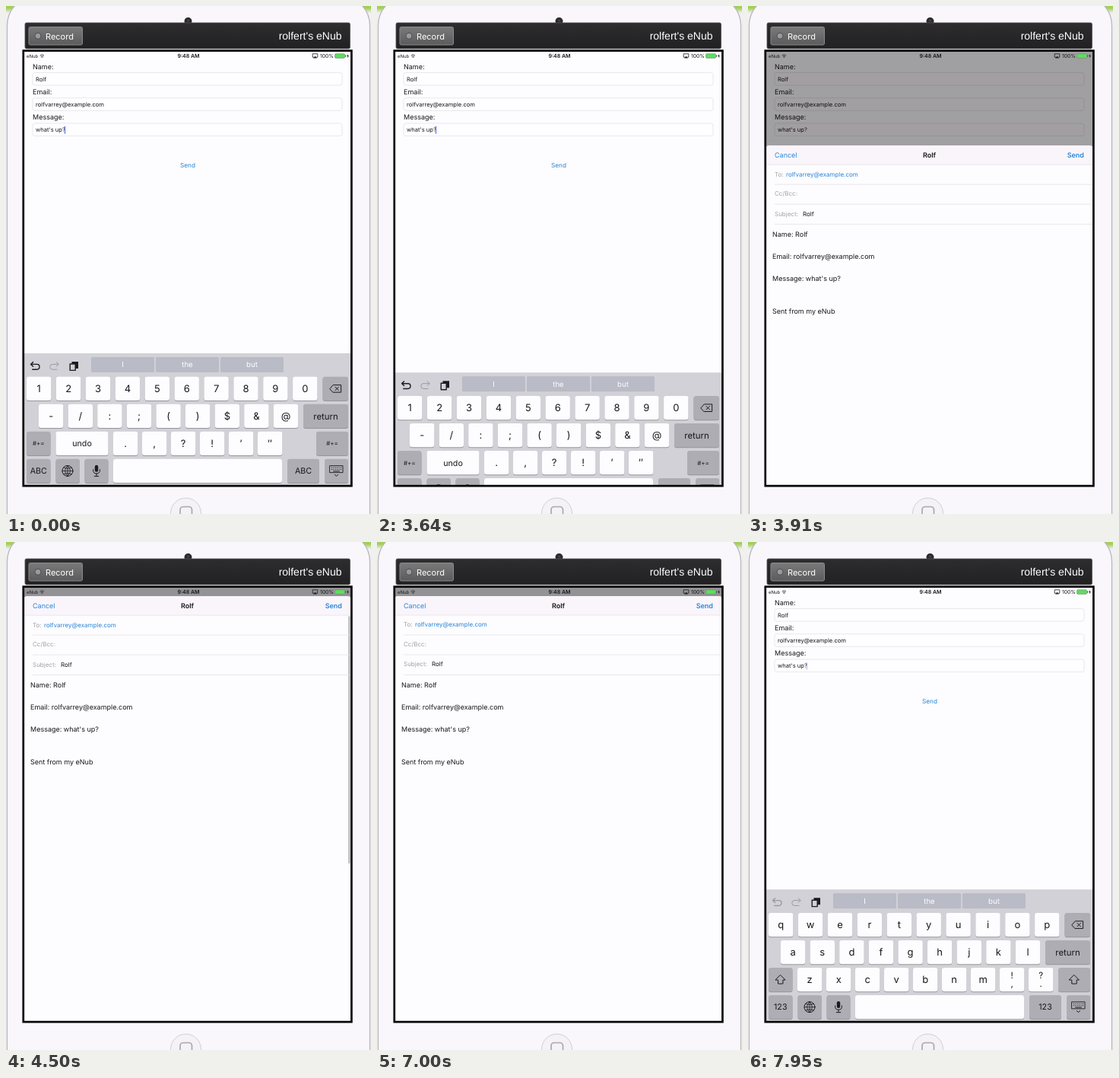
Animation of 480x667 px, one loop 8 s. Source, as an HTML page:

```html
<!DOCTYPE html>
<html lang="en">
<head>
<meta charset="utf-8">
<title>Contact form</title>
<style>
html, body { margin: 0; width: 100%; height: 100%; overflow: hidden; background: #f9f7fb; }
svg { display: block; width: 100vw; height: 100vh; }
text { font-family: Inter, Roboto, sans-serif; text-rendering: geometricPrecision; fill: #17171a; white-space: pre; }
.mid { text-anchor: middle; }
.end { text-anchor: end; }
.bold { font-weight: 600; }
.blue { fill: #2a86d8; }
.grey { fill: #a3a2a8; }
.white { fill: #fff; }
.line { fill: none; stroke: #1c1c1f; stroke-linecap: round; stroke-linejoin: round; }
.field { fill: #fefdff; stroke: #e7e5eb; stroke-width: .9; }
.rule { stroke: #e4e2e8; stroke-width: .8; }
</style>
</head>
<body>
<svg viewBox="0 0 480 667" preserveAspectRatio="none">
  <defs>
    <clipPath id="screen"><rect x="23" y="59" width="432" height="571"/></clipPath>
    <linearGradient id="edge" x2="0" y2="1">
      <stop offset=".004" stop-color="#a3cf58"/><stop offset=".014" stop-color="#f1f0f3"/>
    </linearGradient>
    <linearGradient id="btn" x2="0" y2="1">
      <stop offset="0" stop-color="#7b7a7b"/><stop offset="1" stop-color="#5c5b5c"/>
    </linearGradient>
    <linearGradient id="bar" x2="0" y2="1">
      <stop offset="0" stop-color="#2d2c2e"/><stop offset="1" stop-color="#212022"/>
    </linearGradient>
  </defs>

  <rect width="480" height="667" fill="url(#edge)"/>
  <rect x="1.5" y="-14" width="477" height="760" rx="40" fill="#f9f7fb" stroke="#b9b7bd" stroke-width="1.3"/>
  <circle cx="239.5" cy="20" r="5" fill="#2b2a2c"/>
  <circle cx="239.5" cy="19" r="1.6" fill="#434247"/>
  <circle cx="236.5" cy="666" r="20" fill="#f4f2f6" stroke="#d0ced4"/>
  <rect x="229" y="657.5" width="15.5" height="16" rx="4" fill="none" stroke="#aaa8ae" stroke-width="1.7"/>

  <rect x="25" y="22" width="427.5" height="34" rx="2" fill="url(#bar)" stroke="#58575a" stroke-width=".8"/>
  <rect x="30" y="27.5" width="70.5" height="23.5" rx="2" fill="url(#btn)" stroke="#8a898b"/>
  <circle cx="42" cy="39.3" r="4" fill="#99989a" stroke="#4d4c4e"/>
  <text x="52" y="43.8" font-size="11" class="white">Record</text>
  <text x="441.5" y="43.5" font-size="14" class="white end" style="font-family:'Liberation Sans',Arial,sans-serif">rolfert's eNub</text>

  <g clip-path="url(#screen)">
    <rect x="23" y="59" width="432" height="571" fill="#fdfcfe"/>
    <g id="form"></g>
    <rect id="caret" x="77" y="157.8" width="1" height="10" fill="#3f63d6"/>
    <rect id="dim" x="23" y="59" width="432" height="571" fill="#08060a"/>
    <g id="status">
      <path d="M45 64.8q2.4-2.4 4.8 0M46 66.3q1.4-1.3 2.8 0" class="line" stroke-width=".8"/>
      <circle cx="47.4" cy="67.5" r=".6" fill="#1c1c1f"/>
      <path d="M404.6 67.2h-1.4v-4.4h6.6v4.4h-1.4" class="line" stroke-width=".8"/>
      <path d="M404 68.6l2.5-2.8 2.5 2.8z" fill="#1c1c1f"/>
      <rect x="432.5" y="62.8" width="13" height="5.6" rx="1.2" fill="#5fdc62" stroke="#6c8a6e" stroke-width=".6"/>
      <rect x="446" y="64.5" width="1" height="2.2" fill="#555"/>
      <path d="M450 62.8l-2 3.2h1.4l-.6 2.6 2.2-3.4h-1.5z" fill="#1c1c1f"/>
    </g>
    <g id="sheet">
      <path d="M23 600V5q0-5 5-5H449q5 0 5 5V600z" fill="#fdfcfe"/>
      <path d="M23 25V5q0-5 5-5H449q5 0 5 5V25z" fill="#faf5fa"/>
      <rect id="scroll" x="450.4" y="26" width="2" height="325" rx="1" fill="#aeadb3"/>
    </g>
    <g id="keyboard">
      <rect x="23" y="456" width="432" height="180" fill="#d2d1d7"/>
    </g>
  </g>
  <rect x="22.8" y="58.7" width="431.6" height="571.4" fill="none" stroke="#050505" stroke-width="2.7"/>
</svg>
<script>
const $ = id => document.getElementById(id);
const NS = 'http://www.w3.org/2000/svg';
const MAIL = 'rolfvarrey@example.com', WHO = 'Rolf', SAYS = "what's up?";

function add(parent, tag, attrs, content) {
  const el = document.createElementNS(NS, tag);
  for (const k in attrs) el.setAttribute(k, attrs[k]);
  if (content) el.textContent = content;
  return parent.appendChild(el);
}
const text = (parent, x, y, size, str, cls = '') =>
  add(parent, 'text', { x, y, 'font-size': size, class: cls }, str);
const icon = (parent, d, attrs) => add(parent, 'path', { d, class: 'line', ...attrs });

// Form
const form = $('form');
[['Name:', WHO], ['Email:', MAIL], ['Message:', SAYS]].forEach(([label, value], i) => {
  const y = 82.7 + i * 33.3;
  text(form, 35, y, 9, label);
  add(form, 'rect', { x: 35, y: y + 4.8, width: 407, height: 16.6, rx: 3, class: 'field' });
  text(form, 39, y + 15.8, 7.6, value);
});
text(form, 239, 212.2, 8.2, 'Send', 'mid blue');

// Status bar
const status = $('status');
text(status, 27, 68, 6, 'eNub');
text(status, 240, 68, 7, '9:48 AM', 'mid bold');
text(status, 431, 68, 6.8, '100%', 'end');

// Mail sheet, measured from its top edge
const sheet = $('sheet');
text(sheet, 35, 15.8, 9, 'Cancel', 'blue');
text(sheet, 238.5, 15.8, 9, WHO, 'mid bold');
text(sheet, 442, 15.8, 9, 'Send', 'end bold blue');
add(sheet, 'path', { d: 'M23 25H454M35 51H454M35 77H454M35 103.4H454', class: 'rule' });
text(sheet, 35, 40.4, 8, 'To:', 'grey');
text(sheet, 50, 40.4, 8, MAIL, 'blue');
text(sheet, 35, 66.3, 8, 'Cc/Bcc:', 'grey');
text(sheet, 35, 92.4, 8, 'Subject:', 'grey');
text(sheet, 72, 92.4, 8, WHO);
text(sheet, 32, 119.8, 9, 'Name: ' + WHO);
text(sheet, 32, 148.7, 9, 'Email: ' + MAIL);
text(sheet, 32, 177.7, 9, 'Message: ' + SAYS);
text(sheet, 32, 220.8, 9, 'Sent from my eNub');

// Keyboard
const board = $('keyboard');
const ROW = [486.8, 522.8, 558.8, 594.8], KEY_H = 31.2;

function key(parent, x, row, w, label, size = 13, dark = false) {
  const y = ROW[row];
  add(parent, 'rect', { x, y: y + 1, width: w, height: KEY_H, rx: 3.2, fill: '#96959b' });
  add(parent, 'rect', { x, y, width: w, height: KEY_H, rx: 3.2, fill: dark ? '#aeadb3' : '#fdfcfe' });
  if (label) text(parent, x + w / 2, y + KEY_H / 2 + size * .36, size, label, 'mid');
}
const keys = (parent, labels, x, step, row) =>
  [...labels].forEach((c, i) => key(parent, x + i * step, row, 32.4, c));

['I', 'the', 'but'].forEach((word, i) => {
  const x = 112 + i * 85;
  add(board, 'rect', { x, y: 461, width: 83, height: 20, rx: 1.5, fill: '#b9bbc6' });
  text(board, x + 41.5, 474.3, 9.7, word, 'mid white');
});
const undo = icon(board, 'M35.6 467.6l-3 2.8 3 2.8M32.8 470.4h8q3.2 0 3.2 3.4t-3.2 3.4h-6', { 'stroke-width': 1.4 });
icon(board, 'M66.2 467.6l3 2.8-3 2.8M69 470.4h-8q-3.2 0-3.2 3.4t3.2 3.4h6', { style: 'stroke:#9c9ba2' });
add(board, 'path', { d: 'M86.5 467h8.5v9h-8.5z', fill: '#1c1c1f' });
icon(board, 'M84.2 470h7v8.4h-7z', { 'stroke-width': 1.4, style: 'fill:#d2d1d7' });

key(board, 416.5, 0, 33.5, '', 0, true);
icon(board, 'M426 502.4l4.2-4.8h10.4v9.6h-10.4zM433 500.2l4.4 4.4M437.4 500.2l-4.4 4.4');
key(board, 391, 1, 59, 'return', 11.4, true);
key(board, 65.5, 3, 31.5, '', 0, true);
icon(board, 'M74 610.4h14M81 603.4v14M75.6 606.2q5.4 2.6 10.8 0M75.6 614.6q5.4-2.6 10.8 0M81 603.4q-7 7 0 14q7-7 0-14', { 'stroke-width': .8 });
add(board, 'circle', { cx: 81, cy: 610.4, r: 7, class: 'line' });
key(board, 103.5, 3, 31, '', 0, true);
add(board, 'rect', { x: 116.8, y: 602.8, width: 4.4, height: 9, rx: 2.2, fill: '#1c1c1f' });
icon(board, 'M114.6 608.6v1q0 4.4 4.4 4.4t4.4-4.4v-1M119 614v3.2M116.2 617.4h5.6');
key(board, 141, 3, 222, '');
key(board, 419, 3, 31, '', 0, true);
icon(board, 'M426 603.6h17v9h-17z', { 'stroke-width': .9 });
icon(board, 'M428 606h13M428 608.4h13', { 'stroke-dasharray': '1 1.4', style: 'stroke-linecap:butt' });
icon(board, 'M430.5 610.8h8M432.4 615.4l2.1 1.8 2.1-1.8');

const nums = add(board, 'g', {}), letters = add(board, 'g', {});
keys(nums, '1234567890', 27, 38.9, 0);
keys(nums, '-/:;()$&@', 43, 38.6, 1);
key(nums, 27, 2, 31.5, '#+=', 8, true);
key(nums, 65.5, 2, 69, 'undo', 10.7);
keys(nums, '.,?!′″', 141, 38, 2);
key(nums, 408, 2, 42, '#+=', 8, true);
keys(letters, 'qwertyuiop', 27, 38.9, 0);
keys(letters, 'asdfghjkl', 43, 38.6, 1);
keys(letters, 'zxcvbnm', 65, 38, 2);
[['!', ','], ['?', '.']].forEach(([top, low], i) => {
  const x = 331 + i * 38;
  key(letters, x, 2, 32.4, '');
  text(letters, x + 16.2, 573.2, 11.5, top, 'mid');
  text(letters, x + 16.2, 584, 11.5, low, 'mid');
});
[[27, 31.5], [408, 42]].forEach(([x, w]) => {
  key(letters, x, 2, w, '', 0, true);
  icon(letters, `M${x + w / 2} 568.4l6.4 6.4h-3.2v5h-6.4v-5h-3.2z`);
});
[[nums, 'ABC'], [letters, '123']].forEach(([g, label]) => {
  key(g, 27, 3, 31.5, label, 10.7, true);
  key(g, 370, 3, 42, label, 10.7, true);
});

// Motion
const LOOP = 8000, SHOW = 3680, HIDE = 7310;
const ramp = (t, a, b) => Math.min(1, Math.max(0, (t - a) / (b - a)));
const spring = (t, rate) => {
  const x = Math.max(0, t) / 1000 * rate;
  return 1 - (1 + x) * Math.exp(-x);
};
// Rises at SHOW and falls back at HIDE
const pulse = (t, rate) => t < HIDE ? spring(t - SHOW, rate) : 1 - spring(t - HIDE, rate);

function caretAlpha(t) {
  if (t > 7000) return ramp(t, 7850, 8100);
  if (t > SHOW) return 1 - ramp(t, SHOW, 3720);
  if (t > 3300) return 1;
  const p = (t + 910) % 1110;               // one blink: fade out, rest, fade in
  return 1 - ramp(p, 0, 360) + ramp(p, 540, 900);
}

function draw(t) {
  const late = t > 7000;
  const drop = t < HIDE ? spring(t - 3607, 20) : 1 - spring(t - HIDE, 14);
  sheet.setAttribute('transform', `translate(0 ${71 + 559 * (1 - pulse(t, 13))})`);
  $('dim').setAttribute('opacity', .43 * pulse(t, 16));
  board.setAttribute('transform', `translate(0 ${178 * drop})`);
  $('caret').setAttribute('opacity', caretAlpha(t));
  $('scroll').setAttribute('opacity', ramp(t, 4200, 4400) - ramp(t, 5360, 5640));
  nums.setAttribute('visibility', late ? 'hidden' : 'visible');
  letters.setAttribute('visibility', late ? 'visible' : 'hidden');
  undo.style.stroke = late ? '#9c9ba2' : '#1c1c1f';
}

let start;
function tick(now) {
  start ??= now;
  draw((now - start) % LOOP);
  requestAnimationFrame(tick);
}
draw(0);
requestAnimationFrame(tick);
</script>
</body>
</html>
```
